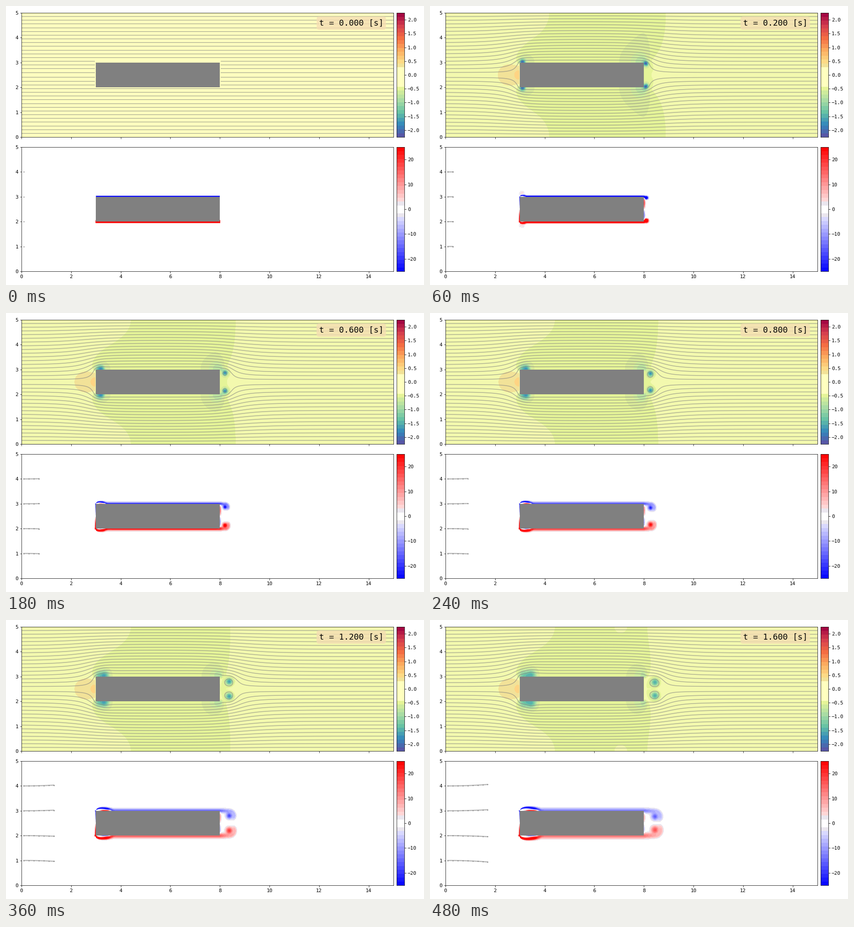
Animation of 917x611 px, one loop 510 ms. Source, as a matplotlib script:

```python
import numpy as np
import matplotlib.pyplot as plt
from matplotlib.animation import FuncAnimation
from matplotlib.patches import Rectangle

WIDTH, HEIGHT, DPI = 917, 611, 72
FRAMES, INTERVAL, DT = 17, 30, 0.1
X0, X1, HALF = 3.0, 8.0, 0.5        # body ends and half height
MID, TOP = 2.5, 2.5                 # centre line, half height of the channel
K = np.pi / TOP
BANDS = 32
P_MAX, W_MAX = 2.25, 25

plt.rcParams["font.family"] = "DejaVu Sans Mono"
plt.rcParams["font.size"] = 11


# ---------- colours ----------
def rgb(*c):
    return tuple(v / 255 for v in c)


centres = (np.arange(BANDS) + 0.5) / BANDS
PALE, CALM = rgb(255, 255, 191), rgb(243, 249, 174)
GREEN, SAND = rgb(229, 244, 152), rgb(242, 226, 152)

p_colors = [plt.get_cmap("Spectral_r")(c)[:3] for c in centres]
p_bar = list(p_colors)
p_bar[12] = GREEN
p_bar[13:18] = [PALE] * 5
p_bar[18] = SAND
p_colors[12:20] = [rgb(217, 234, 152), GREEN, CALM, CALM, CALM,
                   SAND, SAND, rgb(254, 212, 132)]
p_start = list(p_colors)            # start-up: the band above zero stays pale
p_start[16] = PALE

w_colors = [plt.get_cmap("bwr")(c)[:3] for c in centres]
w_colors[15] = w_colors[16] = (1, 1, 1)
w_colors[14] = w_colors[17] = rgb(234, 230, 238)

p_levels = np.linspace(-P_MAX, P_MAX, BANDS + 1)
w_levels = np.linspace(-W_MAX, W_MAX, BANDS + 1)
side = 0.1 + 0.15 * np.arange(16)
psi_levels = np.concatenate([-side[::-1], side])


# ---------- flow model, upper half only (y measured from the centre line) ----------
def sig(z):
    return 0.5 * (1 + np.tanh(z / 2))


def bump(x, y, cx, cy, sx, sy=None):
    return np.exp(-((x - cx) / sx) ** 2 - ((y - cy) / (sy or sx)) ** 2)


def green(x, y, px, py, core):
    """Stream function of a unit vortex between two walls."""
    c = np.cosh(K * (x - px)) + 0.5 * (K * core) ** 2
    near = c - np.cos(K * (y - py))
    far = c - np.cos(K * (y + py))
    return np.log(near / far) / (4 * np.pi)


def mirror(a, sign):
    return np.concatenate([sign * a[:0:-1], a])


STEP = 0.05
CORE = 0.184 * STEP
face = np.arange(STEP / 2, HALF, STEP)
roof = np.arange(X0 + STEP / 2, X1, STEP)
bx = np.concatenate([np.full(face.size, X0), roof, np.full(face.size, X1)])
by = np.concatenate([face, np.full(roof.size, HALF), face[::-1]])
on_roof = by == HALF
wall = green(bx[:, None], by[:, None], bx, by, CORE)

xs = np.linspace(0, 15, 401)
ys = np.linspace(0, TOP, 68)
X, Y = np.meshgrid(xs, ys)
Y_FULL = MID + np.concatenate([-ys[:0:-1], ys])
reach = green(X[..., None], Y[..., None], bx, by, CORE)

wx = np.linspace(2.6, 9.2, 529)
wy = np.linspace(0, 1, 81)
WX, WY = np.meshgrid(wx, wy)
WY_FULL = MID + np.concatenate([-wy[:0:-1], wy])


def base_pressure():
    """Bernoulli pressure of the potential flow, sampled just off the body."""
    gap = 0.06
    px = np.where((Y < HALF) & (X > X0 - gap) & (X < X0), X0 - gap, X)
    px = np.where((Y < HALF) & (X > X1) & (X < X1 + gap), X1 + gap, px)
    inside = (X >= X0) & (X <= X1) & (Y < HALF + gap)
    py = np.where(inside, HALF + gap, Y)
    px, py = px[..., None], py[..., None]
    g = np.linalg.solve(wall, -by)
    c = np.cosh(K * (px - bx))
    near = c - np.cos(K * (py - by)) + 1e-9
    far = c - np.cos(K * (py + by)) + 1e-9
    k = K / (4 * np.pi)
    u = 1 + (k * (np.sin(K * (py - by)) / near - np.sin(K * (py + by)) / far)) @ g
    v = (k * np.sinh(K * (px - bx)) * (1 / near - 1 / far)) @ g
    p = np.clip(0.5 * (1 - u ** 2 - v ** 2) - 0.02, -0.6, 0.5)
    return np.where(X > X1, np.minimum(p, -0.02), p)


P_BASE = base_pressure()


def rear_vortex(t):
    times = [0.1, 0.4, 0.8, 1.2, 1.6]
    x = np.interp(t, times, [8.06, 8.15, 8.27, 8.38, 8.45])
    y = np.interp(t, times, [0.47, 0.40, 0.34, 0.30, 0.27])
    return x, y


def bubble(t):
    """Length and height of the separated zone behind the front corner."""
    return 0.22 + 0.42 * t, 0.045 + 0.055 * t


def stream(t):
    if t == 0:
        return Y
    length, height = bubble(t)
    vortices = [
        (*rear_vortex(t), 1.5 * np.sqrt(t), 0.1 * np.sqrt(t)),
        (X0 + 0.5 * length, HALF + 0.8 * height, 0.12 + 0.32 * t, 0.05 + 0.05 * t)]
    rhs = -by - np.where(on_roof, 0.05 * np.sqrt(t), 0)
    psi = Y.copy()
    for cx, cy, strength, core in vortices:
        psi += strength * green(X, Y, cx, cy, core)
        rhs = rhs - strength * green(bx, by, cx, cy, core)
    return psi + reach @ np.linalg.solve(wall, rhs)


def pressure(t):
    if t == 0:
        return np.full_like(X, 0.05)
    kick = np.exp(-(t - 0.1) / 0.06)      # impulsive start
    p = P_BASE + kick * (0.06 - 0.4 * sig((X - 5.5) / 1.2))
    p -= (0.22 - 0.07 * t) * (1 - 0.7 * kick) * np.exp(-((X - 8.3) / 0.9) ** 2)
    p -= 0.15 * bump(X, Y, 8.1, 0, 0.25, 0.5)
    p += 0.3 * kick * bump(X, Y, 8.38, 0, 0.14)

    p -= (1.75 - 0.2 * t) * bump(X, Y, *rear_vortex(t), 0.10 + 0.05 * t)

    length, height = bubble(t)
    flat = np.exp(-((X - X0 - 0.35 * length) / (0.42 * length)) ** 4
                  - ((Y - HALF) / (1.9 * height)) ** 2)
    core = bump(X, Y, X0 + 0.62 * length - 0.1, HALF + 0.8 * height, 0.1 + 0.05 * t)
    front = 0.75 * flat + (0.4 + np.exp(-t / 0.3)) * core
    return p - front * sig((X - X0 + 0.02) / 0.03)


def vorticity(t):
    d = np.sqrt(0.0009 + 0.0062 * t)
    amp = 1.25 / (0.886 * d)
    layer = amp * (1 + 3 * np.exp(-t / 0.15)) * np.exp(-((WY - HALF) / d) ** 2)
    if t == 0:
        return -layer * ((WX > X0 - 0.01) & (WX < X1 + 0.01))

    cx, cy = rear_vortex(t)
    length, height = bubble(t)
    s = (WX - X0) / length
    fade = 1 - 0.5 * np.clip((WX - X1) / (cx - X1), 0, 1)
    w = -layer * fade * sig((s - 0.85) / 0.06) * sig((cx - WX) / 0.04)

    # rolled-up wake vortex with its outer arm
    r = np.hypot(WX - cx, WY - cy)
    angle = np.arctan2(WY - cy, WX - cx)
    arm = np.exp(-((r - (0.52 - cy)) / (0.8 * d)) ** 2)
    arm *= sig((angle + 0.7) / 0.2) * sig((1.6 - angle) / 0.15)
    w -= 0.42 * amp * arm
    w -= 21 / t ** 0.55 * bump(WX, WY, cx, cy, 0.1183 * np.sqrt(t))

    # rear and front faces
    w += (10 / t ** 0.8 * np.exp(-((WX - X1) / 0.045) ** 2) * (WX >= X1)
          * np.sin(np.pi * np.clip(WY / HALF, 0, 1)) * (1 - np.exp(-t / 0.3)))
    w -= (45 * np.clip(WY / HALF, 0, 1) * (WY <= HALF + 0.02) * (WX <= X0)
          * np.exp(-((WX - X0) / 0.026) ** 2))

    # separated layer over the front corner
    sc = np.clip(s, 0, 1)
    crest = HALF + height * np.sin(np.pi * sc ** 0.65) ** 0.7
    thick = 0.025 + (0.015 + 0.025 * t) * sc
    w -= ((46 - 36 * sc) * np.exp(-((WY - crest) / thick) ** 2)
          * sig((s + 0.03) / 0.02) * sig((0.95 - s) / 0.05))
    w -= 9 * bump(WX, WY, X0 + 0.6 * length, HALF + 0.75 * height, 0.17 * length, 0.05)
    w += (26 * sig((t - 0.6) / 0.1) * np.exp(-((WY - HALF) / 0.025) ** 2)
          * sig((s - 0.3) / 0.05) * sig((0.78 - s) / 0.05))

    # start-up ripples at the corners
    ripple = np.sin(110 * WX - 60 * WY) * (WY > HALF)
    w += 9 * np.exp(-t / 0.35) * ripple * bump(
        WX, WY, X0 + 0.4 * t, 0.6 + 0.2 * t, 0.08 + 0.15 * t)
    w += 8 * np.exp(-(t - 0.1) / 0.08) * ripple * bump(WX, WY, 8.12, 0.53, 0.07)
    return w


# ---------- stage ----------
fig = plt.figure(figsize=(WIDTH / DPI, HEIGHT / DPI), dpi=DPI, facecolor="white")


def panel(left, top, right, bottom):
    return fig.add_axes([left / WIDTH, 1 - bottom / HEIGHT,
                         (right - left) / WIDTH, (bottom - top) / HEIGHT])


def flow_panel(top, bottom, labels):
    ax = panel(34, top, 850, bottom)
    ax.set(xlim=(0, 15), ylim=(0, 5), xticks=range(0, 15, 2), yticks=range(6))
    ax.tick_params(labelbottom=labels)
    ax.add_patch(Rectangle((X0, MID - HALF), X1 - X0, 2 * HALF,
                           color="gray", lw=0, zorder=2.6))
    return ax


def color_bar(top, bottom, colors, limit, ticks):
    ax = panel(857, top, 874, bottom)
    ax.imshow(np.array(colors)[:, None, :], extent=(0, 1, -limit, limit),
              origin="lower", aspect="auto", interpolation="nearest")
    ax.set_xticks([])
    ax.yaxis.tick_right()
    ax.set_yticks(ticks)


ax_p = flow_panel(15, 287, False)
ax_w = flow_panel(309, 581, True)
color_bar(15, 287, p_bar, P_MAX, np.arange(-2, 2.1, 0.5))
color_bar(309, 581, w_colors, W_MAX, range(-20, 21, 10))

rim = ax_p.add_patch(Rectangle((2.96, 1.97), 5.08, 1.1, color=PALE, lw=0, zorder=2.5))
label = ax_p.text(0.8, 0.95, "", transform=ax_p.transAxes, fontsize=18, va="top",
                  zorder=3, bbox=dict(boxstyle="round", facecolor="wheat",
                                      edgecolor="none", alpha=0.8))
seeds = [1, 2, 3, 4]
streaks = [ax_w.plot([], [], color="0.72", lw=2.4, solid_capstyle="butt")[0]
           for _ in seeds]
dots = [ax_w.plot([], [], ls="", marker="o", ms=2.2, mew=0, color="0.5")[0]
        for _ in seeds]
fields = []


def drift(x, y0):
    gain = 0.06 if abs(y0 - MID) > 1 else 0.042
    return y0 + np.sign(y0 - MID) * gain * (x / 1.7) ** 2.2


def draw_streaks(n):
    tip = 0.1 + n * DT
    line = np.linspace(0.07, tip + 0.02, 40) if n > 1 else np.array([])
    marks = np.append(np.arange(0.1, tip, 0.2), tip) if n > 1 else np.array([tip])
    for y0, streak, dot in zip(seeds, streaks, dots):
        streak.set_data(line, drift(line, y0))
        dot.set_data(marks, drift(marks, y0))


def draw(n):
    t = n * DT
    while fields:
        fields.pop().remove()
    p = np.clip(mirror(pressure(t), 1), -P_MAX + 0.01, P_MAX - 0.01)
    w = np.clip(mirror(vorticity(t), -1), -W_MAX + 0.1, W_MAX - 0.1)
    fields.append(ax_p.contourf(xs, Y_FULL, p, p_levels,
                                colors=p_start if n < 2 else p_colors))
    fields.append(ax_p.contour(xs, Y_FULL, mirror(stream(t), -1), psi_levels,
                               colors="gray", alpha=0.6, linewidths=1.5,
                               linestyles="solid"))
    fields.append(ax_w.contourf(wx, WY_FULL, w, w_levels, colors=w_colors))
    rim.set_visible(n == 0)
    draw_streaks(n)
    label.set_text(f"t = {t:.3f} [s]")
    return []


anim = FuncAnimation(fig, draw, frames=FRAMES, interval=INTERVAL,
                     repeat=True, repeat_delay=0, blit=False)
plt.show()
```
